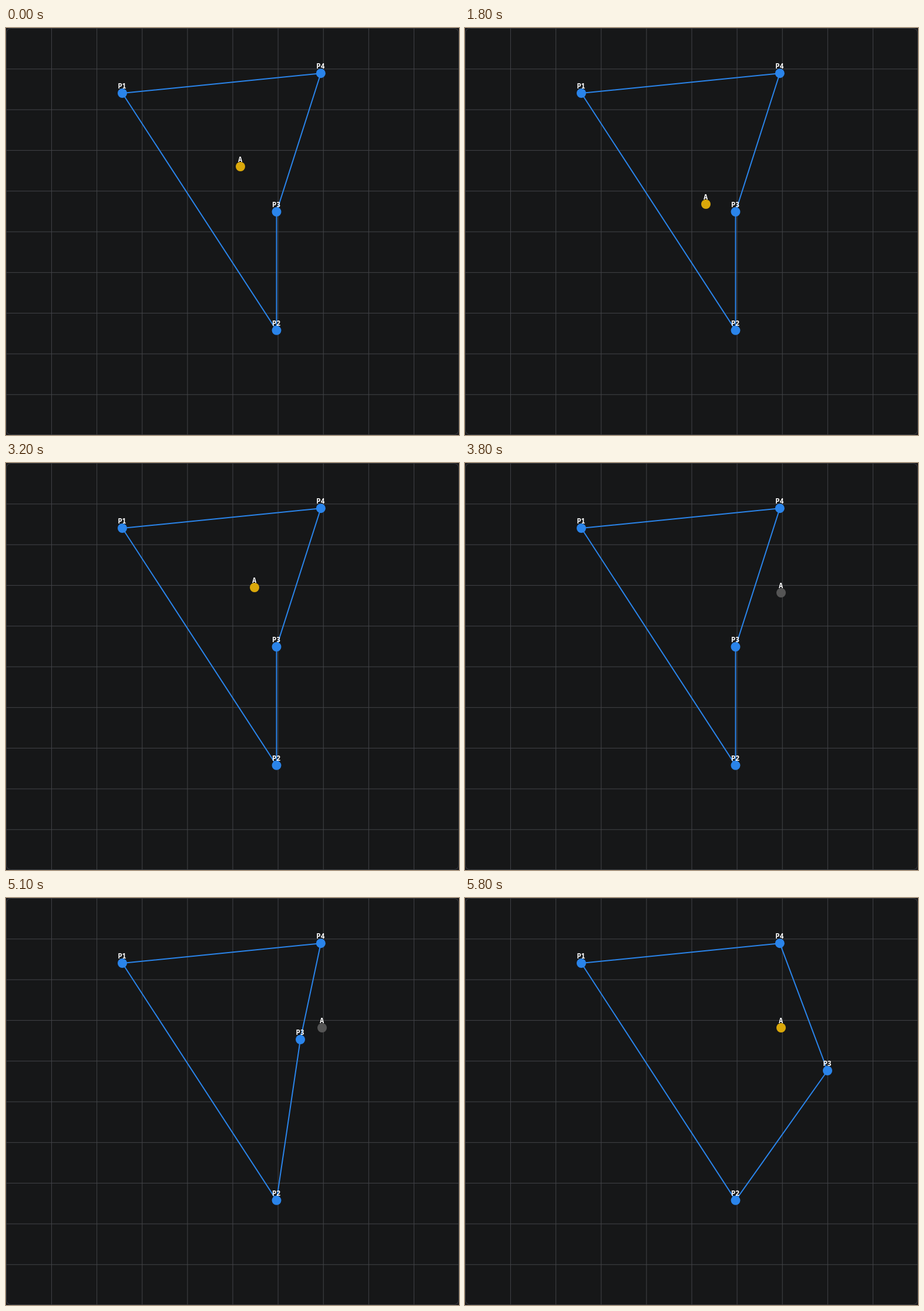
Write an HTML page that moves like this. It is 771x693 px and loops after 6.6 s.

```html
<!DOCTYPE html>
<html lang="en">
<head>
<meta charset="utf-8">
<title>Point in polygon</title>
<style>
  html, body { margin: 0; width: 100%; height: 100%; overflow: hidden; background: #1b1b1f; }
  svg { display: block; width: 771px; height: 693px; }
  .panel { fill: #161718; stroke: #3c3f44; }
  .grid { fill: none; stroke: #434448; }
  .shape { fill: none; stroke: #2a84ea; stroke-width: 2; stroke-linejoin: round; }
  .dot { fill: #2a84ea; }
  .dot.inside { fill: #daa80a; }
  .dot.outside { fill: #555; }
  text { font: 600 12px "Noto Sans Mono", "DejaVu Sans Mono", monospace; fill: #fff; text-anchor: middle; }
</style>
</head>
<body>
<svg viewBox="0 0 771 693">
  <rect class="panel" x=".5" y=".5" width="770" height="692" rx="8"/>
  <path class="grid"/>
  <polygon class="shape"/>
</svg>
<script>
  const LOOP = 6600, TICK = 100, W = 771, H = 693;
  const svg = document.querySelector('svg');
  const shape = document.querySelector('.shape');

  // Turning points of each drag: [tick, x, y]
  const dragA = [
    [0, 399, 236], [4, 307, 155], [7, 294, 197], [11, 452, 128], [14, 431, 144], [17, 390, 268],
    [21, 506, 369], [25, 568, 357], [28, 449, 228], [30, 406, 211], [31, 406, 211], [38, 538, 221]
  ];
  const dragP3 = [
    [42, 460.5, 313], [45, 594, 263], [49, 599, 222], [51, 501, 241],
    [53, 454, 281], [56, 520, 310], [58, 617, 294]
  ];

  const points = [[198, 111], [460.5, 514.8], [460.5, 313], [535.8, 77.2]];

  // Smooth curve through the turning points, still before and after
  function along(path, t) {
    const last = path.length - 1;
    if (t <= path[0][0]) return path[0].slice(1);
    if (t >= path[last][0]) return path[last].slice(1);
    const i = path.findIndex(p => p[0] > t) - 1;
    const a = path[i], b = path[i + 1];
    const span = b[0] - a[0], u = (t - a[0]) / span;
    const slope = (k, axis) => {
      const p = path[Math.max(k - 1, 0)], q = path[Math.min(k + 1, last)];
      return (q[axis] - p[axis]) / (q[0] - p[0]) * span;
    };
    return [1, 2].map(axis => Math.round(
      a[axis] * (1 + 2 * u) * (1 - u) ** 2 + slope(i, axis) * u * (1 - u) ** 2 +
      b[axis] * u * u * (3 - 2 * u) + slope(i + 1, axis) * u * u * (u - 1)));
  }

  function contains(poly, [x, y]) {
    let inside = false;
    poly.forEach(([x1, y1], i) => {
      const [x2, y2] = poly[(i + 1) % poly.length];
      if (y1 > y !== y2 > y && x < x1 + (y - y1) * (x2 - x1) / (y2 - y1)) inside = !inside;
    });
    return inside;
  }

  function add(tag, attrs) {
    const el = document.createElementNS(svg.namespaceURI, tag);
    for (const key in attrs) el.setAttribute(key, attrs[key]);
    return svg.appendChild(el);
  }

  function addPoint(name) {
    const dot = add('circle', { class: 'dot', r: 8 });
    const label = add('text', {});
    label.textContent = name;
    return {
      dot,
      move([x, y]) {
        dot.setAttribute('cx', x);
        dot.setAttribute('cy', y);
        label.setAttribute('x', x - 0.4);
        label.setAttribute('y', y - 7.8);
      }
    };
  }

  let grid = '';
  for (let i = 1; i < 10; i++) {
    grid += `M${W * i / 10 + .5} 1V${H - 1}M1 ${H * i / 10 + .5}H${W - 1}`;
  }
  document.querySelector('.grid').setAttribute('d', grid);

  const corners = points.map((p, i) => addPoint('P' + (i + 1)));
  const probe = addPoint('A');

  function draw(now) {
    const tick = Math.floor(now % LOOP / TICK);
    const a = along(dragA, tick);
    points[2] = along(dragP3, tick);
    shape.setAttribute('points', points.join(' '));
    corners.forEach((c, i) => c.move(points[i]));
    probe.move(a);
    probe.dot.setAttribute('class', 'dot ' + (contains(points, a) ? 'inside' : 'outside'));
  }

  const start = performance.now();
  function frame() {
    draw(performance.now() - start);
    requestAnimationFrame(frame);
  }
  frame();
</script>
</body>
</html>
```
